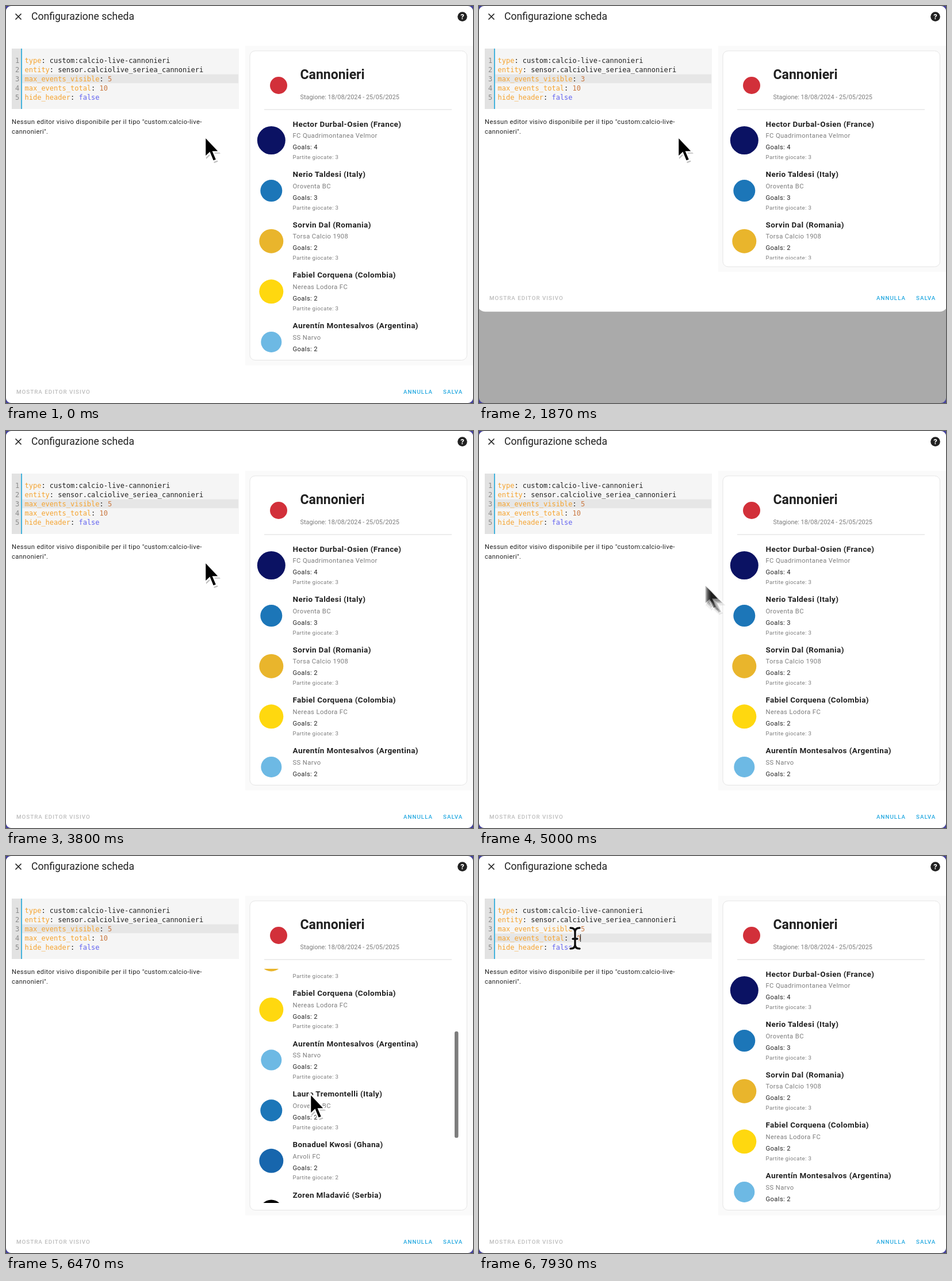
Animation of 812x690 px, one loop 8 s. Source, as an HTML page:

```html
<!DOCTYPE html>
<html lang="it">
<head>
<meta charset="utf-8">
<title>Configurazione scheda</title>
<style>
  html, body { margin: 0; width: 100%; height: 100%; overflow: hidden; background: #4643a0; }
  svg { display: block; width: 812px; height: 690px; font-family: Roboto, sans-serif; fill: #212121; }
  text { white-space: pre; }
  .title { font-size: 17.6px; }
  .heading { font-size: 23px; font-weight: 700; }
  .season { font-size: 10.9px; fill: #7c7c7c; }
  .body, .team { font-size: 11.2px; letter-spacing: .4px; }
  .team { fill: #7c7c7c; }
  .name { font-size: 13.5px; font-weight: 700; letter-spacing: .4px; }
  .small { font-size: 9.6px; letter-spacing: .4px; fill: #7c7c7c; }
  .button { font-size: 9.8px; font-weight: 500; letter-spacing: 1px; fill: #23a8e0; }
  .code { font: 12px "DejaVu Sans Mono", monospace; }
  .key { fill: #f5a32f; }
  .num { fill: #ca7841; }
  .bool { fill: #6262f0; }
</style>
</head>
<body>
<svg viewBox="0 0 812 690">
  <defs>
    <clipPath id="screen"><rect width="812" height="690" rx="9"/></clipPath>
    <clipPath id="listClip"><rect id="listBox" x="425" y="196" width="376"/></clipPath>
    <g id="arrow">
      <path d="M0 0V36L8 28.5 14 43 20.500 40.500 14.500 26.500H25Z" fill="#000" opacity=".25" transform="translate(2 3)"/>
      <path d="M0 0V36L8 28.500 14 43 20.500 40.500 14.500 26.500H25Z" fill="#000" stroke="#fff" stroke-width="2.500"/>
    </g>
    <path id="beamLine" d="M-8-18Q0-18 0-11V11Q0 18-8 18M8-18Q0-18 0-11M0 11Q0 18 8 18M-4 1H4" fill="none" stroke-linecap="round"/>
    <g id="beam">
      <use href="#beamLine" stroke="#fff" stroke-width="6.500"/>
      <use href="#beamLine" stroke="#111" stroke-width="3.500"/>
    </g>
  </defs>
  <g clip-path="url(#screen)">
    <rect width="812" height="690" fill="#aaa"/>
    <rect id="dialog" x="-3" y="-20" width="818" rx="14" fill="#fff"/>

    <path d="M16.500 13.500l10 10m0-10l-10 10" stroke="#212121" stroke-width="1.700"/>
    <text class="title" x="44" y="24.300">Configurazione scheda</text>
    <circle cx="793.500" cy="18.500" r="8.300"/>
    <text x="793.500" y="23.200" font-size="13" font-weight="700" text-anchor="middle" style="fill:#fff">?</text>

    <rect x="10" y="74" width="395" height="105" fill="#f5f5f5"/>
    <rect x="10" y="74" width="16" height="105" fill="#e2e2e2"/>
    <rect x="26" y="74" width="2" height="105" fill="#45b4dc"/>
    <rect id="active" x="28" width="376" height="15.500" fill="#e6e6e6"/>
    <g id="code" class="code"></g>
    <rect id="caret" width="1.200" height="13" fill="#333"/>
    <text class="body" x="10" y="204.500">Nessun editor visivo disponibile per il tipo "custom:calcio-live-</text>
    <text class="body" x="10" y="221.500">cannonieri".</text>

    <rect id="pane" x="416" y="69" width="396" fill="#fafafa"/>
    <rect id="card" x="424" y="78" width="377.500" rx="9" fill="#fff" stroke="#e5e5e5"/>
    <circle cx="474" cy="138" r="15" fill="#d2303a"/>
    <text class="heading" x="511.500" y="127.300">Cannonieri</text>
    <text class="season" x="511.500" y="162">Stagione: 18/08/2024 - 25/05/2025</text>
    <path d="M449 180H775" stroke="#dcdcdc" stroke-width="1.200"/>
    <g clip-path="url(#listClip)"><g id="list"></g></g>
    <rect id="bar" x="780" width="6.500" height="185" rx="3.200" fill="#7d7d7d"/>

    <g id="footer">
      <text class="button" x="18" y="673.500" style="fill:#bdbdbd">MOSTRA EDITOR VISIVO</text>
      <text class="button" x="691" y="673.500">ANNULLA</text>
      <text class="button" x="760" y="673.500">SALVA</text>
    </g>
    <g id="pointer"></g>
  </g>
</svg>
<script>
const LOOP = 8000, ROW = 87.6, CHAR = 7.22, CODE_X = 32.5, SHRINK = 162.4;
const $ = id => document.getElementById(id);
const set = (el, attrs) => { for (const k in attrs) el.setAttribute(k, attrs[k]); };

// name, team, games played, badge colour, badge radius
const players = [
  ['Hector Durbal-Osien (France)', 'FC Quadrimontanea Velmor', 3, '#0b1263', 24.5],
  ['Nerio Taldesi (Italy)', 'Oroventa BC', 3, '#1c76b8', 19],
  ['Sorvin Dal (Romania)', 'Torsa Calcio 1908', 3, '#e9b52c', 21],
  ['Fabiel Corquena (Colombia)', 'Nereas Lodora FC', 3, '#ffd80f', 21],
  ['Aurentín Montesalvos (Argentina)', 'SS Narvo', 3, '#6db9e4', 18],
  ['Lauro Tremontelli (Italy)', 'Oroventa BC', 3, '#1c76b8', 19],
  ['Bonaduel Kwosi (Ghana)', 'Arvoli FC', 2, '#1766ad', 21],
  ['Zoren Mladavić (Serbia)', 'Corventa FC', 3, '#000', 20],
  ['Rinaldo Vespani (Italy)', 'Arvoli FC', 3, '#1766ad', 21],
  ['Olmer Karsten (Norway)', 'Torsa Calcio 1908', 3, '#e9b52c', 21]
];
$('list').innerHTML = players.map(([name, team, games, color, r], i) => `
  <g transform="translate(0 ${i * ROW})">
    <circle cx="461.3" cy="233.5" r="${r}" fill="${color}"/>
    <text class="name" x="498.500" y="209.700">${name}</text>
    <text class="team" x="498.500" y="229.300">${team}</text>
    <text class="body" x="498.500" y="249.300">Goals: ${[4, 3][i] || 2}</text>
    <text class="small" x="498.500" y="266">Partite giocate: ${games}</text>
  </g>`).join('');

const settings = [
  ['type', 'custom:calcio-live-cannonieri', ''],
  ['entity', 'sensor.calciolive_seriea_cannonieri', ''],
  ['max_events_visible', '5', 'num'],
  ['max_events_total', '10', 'num'],
  ['hide_header', 'false', 'bool']
];
$('code').innerHTML = settings.map(([key, value, kind], i) => `
  <text x="16" y="${98.5 + i * 16}" style="fill:#8a8a8a">${i + 1}</text>
  <text x="${CODE_X}" y="${98.5 + i * 16}"><tspan class="key">${key}</tspan>: <tspan class="${kind}" id="value${i}">${value}</tspan></text>`).join('');

const GHOSTS = 5;
$('pointer').innerHTML = '<use/>'.repeat(GHOSTS);
const ghosts = [...$('pointer').children];

// time, value of max_events_visible, active line index
const edits = [[-700, '5', 2], [500, '', 2], [1000, '3', 2], [2900, '', 2], [3150, '5', 2], [7700, '5', 3]];
const moves = [[4850, 346, 227], [5000, 401, 273], [5150, 478, 358], [5300, 529, 413], [6850, 529, 413],
  [7000, 400, 306], [7130, 262, 210], [7300, 195, 164], [7600, 167, 143]];
const scrolls = [[5350, 0], [5500, 70], [5800, 292], [6000, 468], [6250, 468], [6600, 90], [6800, 0]];
const fades = [[5300, 0], [5350, 1], [7250, 1], [7500, 0]];

function track(keys, t) {
  const next = keys.findIndex(k => k[0] > t);
  if (next < 0) return keys[keys.length - 1].slice(1);
  if (next === 0) return keys[0].slice(1);
  const a = keys[next - 1], b = keys[next], p = (t - a[0]) / (b[0] - a[0]);
  return a.slice(1).map((v, i) => v + (b[i + 1] - v) * p);
}

function drawPointer(t) {
  const shape = t < 6980 ? '#arrow' : '#beam';
  const now = track(moves, t), before = track(moves, t - 24);
  const moving = Math.hypot(now[0] - before[0], now[1] - before[1]) > 2;
  ghosts.forEach((ghost, i) => {
    const [x, y] = track(moves, t - i * 6);
    set(ghost, {
      href: shape,
      transform: `translate(${x} ${y})`,
      opacity: moving ? 0.34 : i ? 0 : 1
    });
  });
}

function draw(t) {
  const cut = t >= 520 && t < 3200 ? SHRINK : 0;
  set($('dialog'), { height: 713.7 - cut });
  set($('pane'), { height: 555.5 - cut });
  set($('card'), { height: 537.5 - cut });
  set($('listBox'), { height: 407 - cut });
  set($('footer'), { transform: `translate(0 ${-cut})` });

  const [since, value, line] = edits.filter(e => e[0] <= t).pop();
  $('value2').textContent = value;
  const text = line === 2 ? value : settings[line][1];
  const column = settings[line][0].length + 2 + text.length;
  set($('active'), { y: 86.7 + line * 16 });
  set($('caret'), {
    x: CODE_X + column * CHAR - 1,
    y: 88 + line * 16,
    opacity: (t - since) % 1200 < 600 ? 1 : 0
  });

  const [scroll] = track(scrolls, t);
  set($('list'), { transform: `translate(0 ${-scroll})` });
  set($('bar'), { y: 198 + scroll * 0.466, opacity: track(fades, t)[0] });
  drawPointer(t);
}

const start = performance.now();
function tick() {
  draw((performance.now() - start) % LOOP);
  requestAnimationFrame(tick);
}
tick();
</script>
</body>
</html>
```
